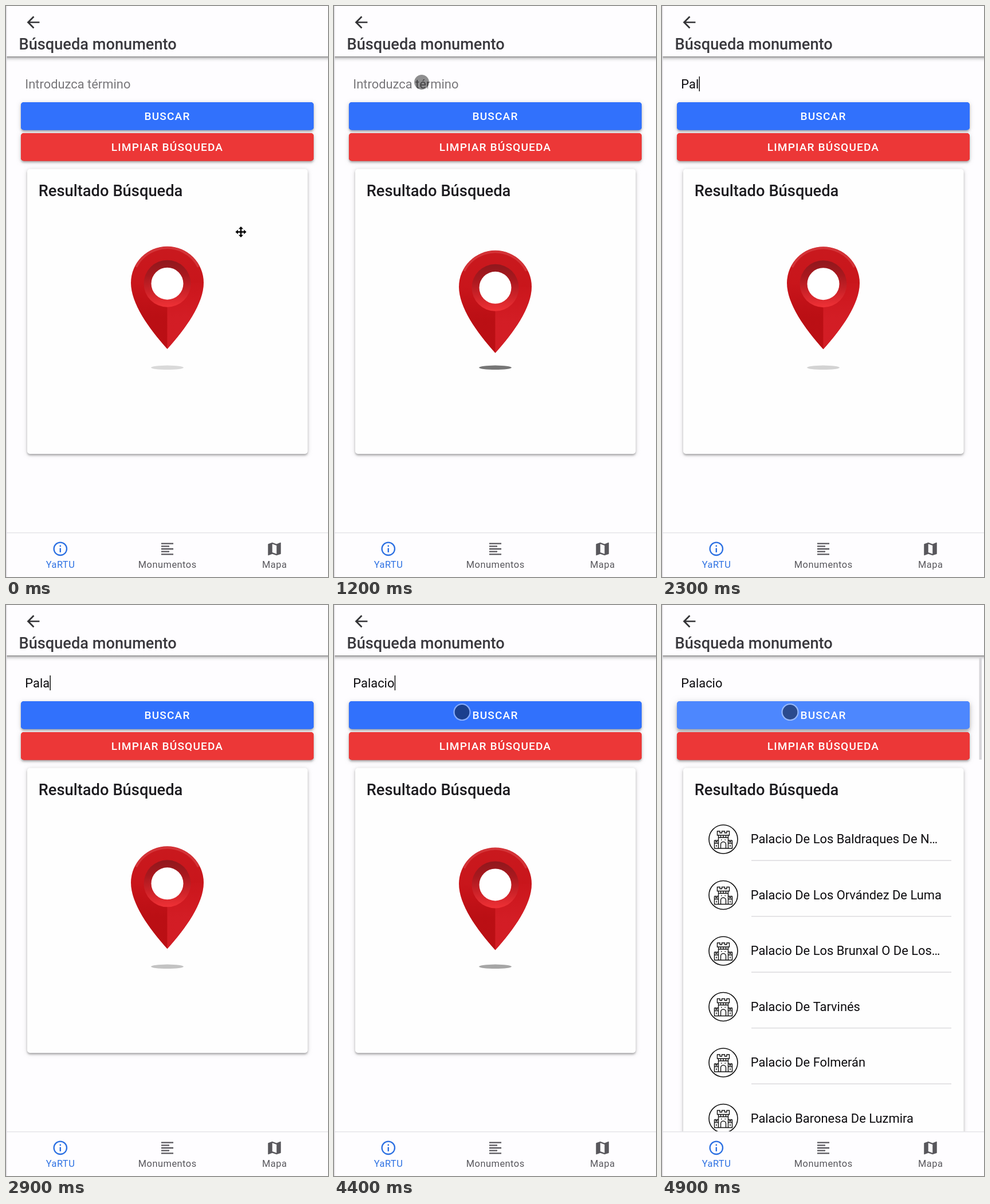
Animation of 562x997 px, one loop 5 s. Source, as an HTML page with a canvas:

```html
<!DOCTYPE html>
<html lang="es">
<head>
<meta charset="utf-8">
<title>Búsqueda monumento</title>
<style>
html, body { margin: 0; width: 100%; height: 100%; overflow: hidden; background: #fefdff; }
canvas { display: block; width: 562px; height: 997px; }
</style>
</head>
<body>
<canvas id="stage" width="562" height="997"></canvas>
<script>
const ctx = document.getElementById('stage').getContext('2d');
const W = 562, H = 997, LOOP = 5000, STEP = 100;
const PAGE = '#fefdff', BLUE = '#3171fc', BLUE_HOVER = '#4d87fe', RED = '#ec3737';
const MID = 281.5;

// When each letter is typed, in ms
const KEYS = [['P', 1600], ['a', 2000], ['l', 2300], ['a', 2600], ['c', 3000], ['i', 3200], ['o', 3400]];
const FOCUS = 600, BLUR = 4500, RESULTS = 4700, HOVER = 4600;
const PLACES = [
  'Palacio De Los Baldraques De N…',
  'Palacio De Los Orvández De Luma',
  'Palacio De Los Brunxal O De Los…',
  'Palacio De Tarvinés',
  'Palacio De Folmerán',
  'Palacio Baronesa De Luzmira'
];
const MAP = new Path2D('M20.5 3l-.16.03L15 5.1 9 3 3.36 4.9c-.21.07-.36.25-.36.48V20.5c0 .28.22.5.5.5l.16-.03L9 18.9l6 2.1 5.64-1.9c.21-.07.36-.25.36-.48V3.5c0-.28-.22-.5-.5-.5zM15 19l-6-2.11V5l6 2.11V19z');
const BACK = new Path2D('M20 11H7.83l5.59-5.59L12 4l-8 8 8 8 1.41-1.41L7.83 13H20v-2z');
const LINES = new Path2D('M3 3h18v2H3zM3 7h12v2H3zM3 11h18v2H3zM3 15h12v2H3zM3 19h18v2H3z');
const CASTLE = new Path2D(
  'M-10.5-14h4.5v3h3.5v-3h5v3h3.5v-3h4.5v7h-21z' +
  'M-8.5-7v23M8.5-7v23M-8.5-3h17M-4.5-7v4M0-7v4M4.5-7v4' +
  'M-15.5 2h2.5v2.5h2v-2.5h2.5M15.5 2h-2.5v2.5h-2v-2.5h-2.5' +
  'M-15.5 2v14h31v-14M-15.5 7h7M15.5 7h-7M-12 10v3M12 10v3' +
  'M-4.5 16v-7a4.5 4.5 0 0 1 9 0v7M-4 1h1.5M2.5 1h1.5');

function text(str, x, y, size, color, { weight = 400, align = 'left', spacing = 0 } = {}) {
  ctx.font = `${weight} ${size}px Roboto, sans-serif`;
  ctx.letterSpacing = spacing + 'px';
  ctx.textAlign = align;
  ctx.fillStyle = color;
  ctx.fillText(str, x, y);
  return ctx.measureText(str).width;
}

function box(x, y, w, h, r, color) {
  ctx.beginPath();
  ctx.roundRect(x, y, w, h, r);
  ctx.fillStyle = color;
  ctx.fill();
}

function disc(x, y, r, color) {
  ctx.beginPath();
  ctx.arc(x, y, r, 0, Math.PI * 2);
  ctx.fillStyle = color;
  ctx.fill();
}

function gradient(y0, y1, ...stops) {
  const g = ctx.createLinearGradient(0, y0, 0, y1);
  stops.forEach((c, i) => g.addColorStop(i / (stops.length - 1), c));
  return g;
}

function raised(x, y, w, h, color, lift = 1) {
  ctx.save();
  for (const [dy, blur, alpha] of [[3, 3, 0.2], [1.4, 7, 0.2]]) {
    ctx.shadowColor = `rgba(0,0,0,${alpha})`;
    ctx.shadowOffsetY = dy * lift;
    ctx.shadowBlur = blur * lift;
    box(x, y, w, h, 5, color);
  }
  ctx.restore();
}

function icon(path, x, y, scale, color) {
  ctx.save();
  ctx.translate(x, y);
  ctx.scale(scale, scale);
  ctx.translate(-12, -12);
  ctx.fillStyle = color;
  ctx.fill(path);
  ctx.restore();
}

function header() {
  ctx.fillStyle = gradient(88, 98, 'rgba(0,0,0,.46)', 'rgba(0,0,0,.16)', 'rgba(0,0,0,.04)', 'rgba(0,0,0,0)');
  ctx.fillRect(1, 88, W, 10);
  icon(BACK, 47.5, 28.5, 1.367, '#333336');
  text('Búsqueda monumento', 22.5, 76, 27.2, '#3a393e', { weight: 500 });
}

function button(label, y, color, lift) {
  raised(26, y, 511, 48.5, color, lift);
  text(label, MID, y + 31, 19.1, '#fff', { weight: 500, align: 'center', spacing: 1.15 });
}

function searchField(t) {
  const typed = KEYS.filter(k => t >= k[1]);
  const word = typed.map(k => k[0]).join('');
  const x = 33.3, y = 143.5;
  const w = word
    ? text(word, x, y, 21.9, '#0c0b0e')
    : (text('Introduzca término', x, y, 21.9, '#78777a'), 0);
  if (t < FOCUS || t >= BLUR) return;
  const since = t - (typed.length ? typed[typed.length - 1][1] : FOCUS);
  if (since % 1000 < 500) {
    ctx.fillStyle = '#111';
    ctx.fillRect(x + w + 0.3, 123, 1.5, 26);
  }
}

function pinHeight(t) {
  const phase = ((t + 100) % 2600) / 2600;
  const ramp = 1 - Math.abs(2 * phase - 1);
  const wave = (1 - Math.cos(2 * Math.PI * phase)) / 2;
  return 418.9 + 7.4 * (ramp + wave) / 2;
}

function pin(t) {
  const top = pinHeight(t);
  ctx.beginPath();
  ctx.ellipse(MID, 631.3, 28.5, 3.7, 0, 0, Math.PI * 2);
  ctx.fillStyle = `rgba(0,0,0,${0.055 * (top - 416.6)})`;
  ctx.fill();

  ctx.save();
  ctx.translate(MID, top + 64);
  ctx.beginPath();
  ctx.arc(0, 0, 63.5, Math.PI, 0);
  ctx.bezierCurveTo(63.5, 36, 32, 80, 0, 115.5);
  ctx.bezierCurveTo(-32, 80, -63.5, 36, -63.5, 0);
  ctx.fillStyle = gradient(-64, 116, '#c9191e', '#c9141a', '#c7141a');
  ctx.fill();
  ctx.clip();
  ctx.fillStyle = gradient(0, 60, 'rgba(182,14,20,0)', 'rgba(184,14,19,.85)');
  ctx.fillRect(-64, 0, 64, 116);
  ctx.fillStyle = gradient(0, 60, 'rgba(214,31,39,.1)', 'rgba(212,30,38,.9)');
  ctx.fillRect(0, 0, 64, 116);
  // Soft rim light along the top
  ctx.beginPath();
  ctx.arc(0, 0, 61, Math.PI * 1.15, Math.PI * 1.85);
  ctx.strokeStyle = 'rgba(225,85,88,.45)';
  ctx.lineWidth = 4;
  ctx.stroke();
  disc(0, 1.5, 41, gradient(-40, 42, '#8f181d', '#a9181e', '#cc2228', '#ef3136'));
  disc(0, 1.5, 28, '#fff');
  ctx.restore();
}

function results() {
  PLACES.forEach((name, i) => {
    const y = 409 + i * 97.5;
    ctx.save();
    ctx.translate(107, y);
    ctx.strokeStyle = '#111';
    ctx.lineWidth = 1.6;
    ctx.beginPath();
    ctx.arc(0, 0, 25, 0, Math.PI * 2);
    ctx.stroke();
    ctx.lineWidth = 1.4;
    ctx.stroke(CASTLE);
    ctx.restore();
    text(name, 154.7, y + 7.3, 21.9, '#0d0c0f');
    ctx.fillStyle = '#dcdbde';
    ctx.fillRect(156, y + 36.4, 349, 1.5);
  });
  box(553.5, 92, 4.5, 178, 0, '#d7d6da');
}

function tabs() {
  ctx.fillStyle = PAGE;
  ctx.fillRect(0, 919, W, H - 919);
  ctx.fillStyle = '#e6e5e9';
  ctx.fillRect(0, 919, W, 1.5);
  const blue = '#2c70e2', gray = '#58575c';
  ctx.beginPath();
  ctx.arc(94.8, 947.8, 11.2, 0, Math.PI * 2);
  ctx.strokeStyle = blue;
  ctx.lineWidth = 2.3;
  ctx.stroke();
  box(93.6, 946.5, 2.4, 7.4, 0, blue);
  box(93.6, 941.6, 2.4, 2.5, 0, blue);
  icon(LINES, 281.5, 948, 1.17, gray);
  icon(MAP, 468.5, 948, 1.25, gray);
  [['YaRTU', 95, blue], ['Monumentos', 281.7, gray], ['Mapa', 468.7, gray]]
    .forEach(([s, x, c]) => text(s, x, 980.5, 16.4, c, { align: 'center', spacing: 0.49 }));
}

function moveCursor(x, y) {
  ctx.save();
  ctx.translate(x, y);
  const p = new Path2D();
  for (let i = 0; i < 4; i++) {
    const arm = new Path2D('M-1.2 0v-5.2h-2.9L0-9.6 4.1-5.2h-2.9V0z');
    p.addPath(arm, new DOMMatrix().rotate(i * 90));
  }
  ctx.strokeStyle = '#fff';
  ctx.lineWidth = 2;
  ctx.stroke(p);
  ctx.fillStyle = '#000';
  ctx.fill(p);
  ctx.restore();
}

const ease = u => u * u * (3 - 2 * u);
function glide(t, t0, t1, [x0, y0], [x1, y1]) {
  const u = ease(Math.min(1, Math.max(0, (t - t0) / (t1 - t0))));
  return [x0 + (x1 - x0) * u, y0 + (y1 - y0) * u];
}

function pointer(t) {
  const rest = [410, 394.5], field = [153, 133], search = [223.5, 187];
  if (t < 100) return moveCursor(...rest);
  // Hidden while typing
  if (t >= 1500 && t < 3900) return;
  const [x, y] = t < 1500 ? glide(t, 0, 500, rest, field) : glide(t, 3900, 4300, field, search);
  disc(x, y, 13, 'rgba(0,0,0,.44)');
  ctx.beginPath();
  ctx.arc(x, y, 14, 0, Math.PI * 2);
  ctx.strokeStyle = 'rgba(255,255,255,.42)';
  ctx.lineWidth = 2.2;
  ctx.stroke();
}

function draw(t) {
  const found = t >= RESULTS, hover = t >= HOVER;
  ctx.fillStyle = PAGE;
  ctx.fillRect(0, 0, W, H);
  header();
  searchField(t);
  button('BUSCAR', 168, hover ? BLUE_HOVER : BLUE, hover ? 1.7 : 1);
  button('LIMPIAR BÚSQUEDA', 222, RED);
  raised(37, 284.5, 489.5, found ? 700 : 497.5, '#fefefe');
  text('Resultado Búsqueda', 56.8, 331.5, 27.3, '#1d1c20', { weight: 500 });
  if (found) results(); else pin(t);
  tabs();
  pointer(t);
  ctx.fillStyle = '#dfdee2';
  ctx.fillRect(0, 0, 1.5, H);
}

const start = performance.now();
function tick() {
  const t = (performance.now() - start) % LOOP;
  draw(Math.floor(t / STEP) * STEP);
  requestAnimationFrame(tick);
}
tick();
</script>
</body>
</html>
```
